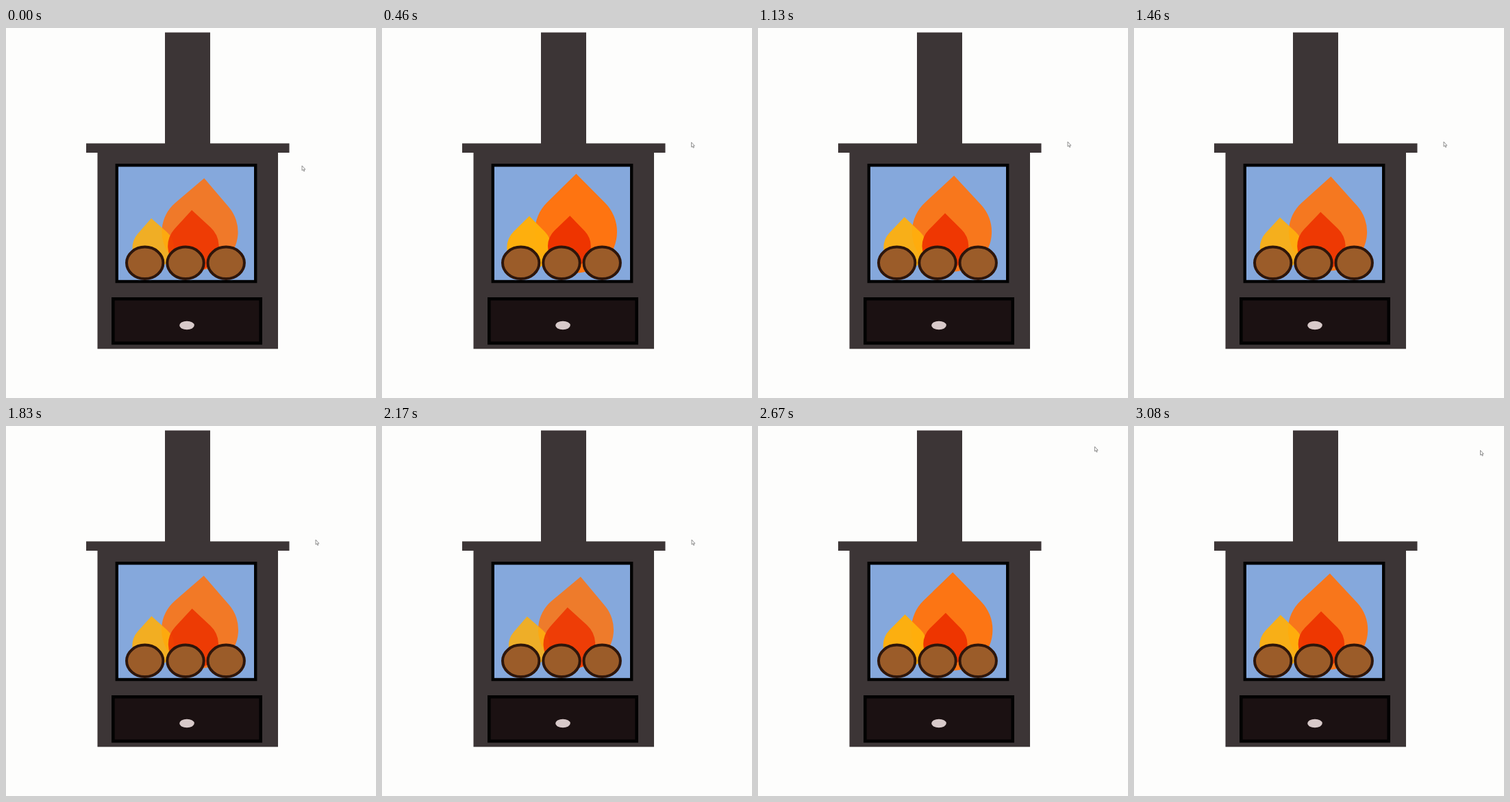
An HTML page that plays this animation: 540x540 px, repeating every 3120 ms.

```html
<!DOCTYPE html>
<html lang="en">
<head>
<meta charset="utf-8">
<title>Wood stove</title>
<style>
  html, body { margin: 0; width: 100%; height: 100%; overflow: hidden; background: #fdfdfc; }
  svg { display: block; width: 100%; height: 100%; }
</style>
</head>
<body>
<svg viewBox="0 0 540 540">
  <defs>
    <!-- unit circle with one sharp corner pointing up -->
    <path id="flame" d="M0-1.414L.707-.707A1 1 0 1 1-.707-.707Z"/>
    <ellipse id="log" cy="342.8" rx="26.7" ry="23.2" fill="#9b5c29" stroke="#2e160b" stroke-width="4"/>
  </defs>
  <g fill="#3c3536">
    <rect x="232" y="6.5" width="66" height="163"/>
    <rect x="117" y="168.4" width="296.5" height="13.6"/>
    <rect x="133.5" y="181" width="263.5" height="287.3"/>
  </g>
  <rect x="161.8" y="200.3" width="202.4" height="169.7" fill="#85a8dc" stroke="#020202" stroke-width="4.4"/>
  <g id="fire"></g>
  <use href="#log" x="202.7"/>
  <use href="#log" x="262"/>
  <use href="#log" x="321.2"/>
  <rect x="156.3" y="395.3" width="215.4" height="64.6" fill="#1b1112" stroke="#020202" stroke-width="4.6"/>
  <ellipse cx="264" cy="434" rx="10.8" ry="6.2" fill="#d8caca"/>
  <path id="cursor" d="M0 0V7L1.6 5.7L2.8 8.2L3.8 7.7L2.7 5.3H4.8Z" fill="#fdfdfc" stroke="#777" stroke-width=".8"/>
</svg>
<script>
const LOOP = 3120, BURN = 2000, RESTART = 365;

// Each pair runs from the start to the end of one burn.
const flames = [
  { x: 283, y: 297.5, r: [60.3, 54.5], turn: [0, 5.6], fill: '#ff7410' },
  { x: 214.8, y: 320.4, r: [32.6, 29.7], turn: [0.5, -4.6], fill: '#ffb00c' },
  { x: 273.4, y: 318.3, r: [31, 38.6], turn: [1.3, -3.3], fill: '#ee3400' }
];
const fade = [1, 0.85];

// Pointer stops: time, x, y
const stops = [
  [0, 432, 201], [400, 451, 167], [620, 454, 166], [800, 452, 166], [2250, 452, 166],
  [2620, 491, 30], [2740, 492, 30], [3080, 505.5, 35.5], [LOOP, 505.5, 35.5]
];

const mix = (a, b, k) => a + (b - a) * k;
const fire = document.getElementById('fire');
const cursor = document.getElementById('cursor');

for (const f of flames) {
  f.el = document.createElementNS('http://www.w3.org/2000/svg', 'use');
  f.el.setAttribute('href', '#flame');
  f.el.setAttribute('fill', f.fill);
  fire.append(f.el);
}

function drawFlames(k) {
  for (const { el, x, y, r, turn } of flames) {
    el.setAttribute('transform',
      `translate(${x} ${y}) rotate(${mix(...turn, k)}) scale(${mix(...r, k)})`);
    el.setAttribute('opacity', mix(...fade, k));
  }
}

function drawCursor(t) {
  const i = stops.findIndex(s => s[0] > t);
  const [t0, x0, y0] = stops[i - 1], [t1, x1, y1] = stops[i];
  let k = (t - t0) / (t1 - t0);
  k = k * k * (3 - 2 * k);
  cursor.setAttribute('transform', `translate(${mix(x0, x1, k)} ${mix(y0, y1, k)})`);
}

const start = performance.now();

function frame() {
  const t = (performance.now() - start) % LOOP;
  drawFlames((t - RESTART + BURN) % BURN / BURN);
  drawCursor(t);
  requestAnimationFrame(frame);
}
frame();
</script>
</body>
</html>
```
